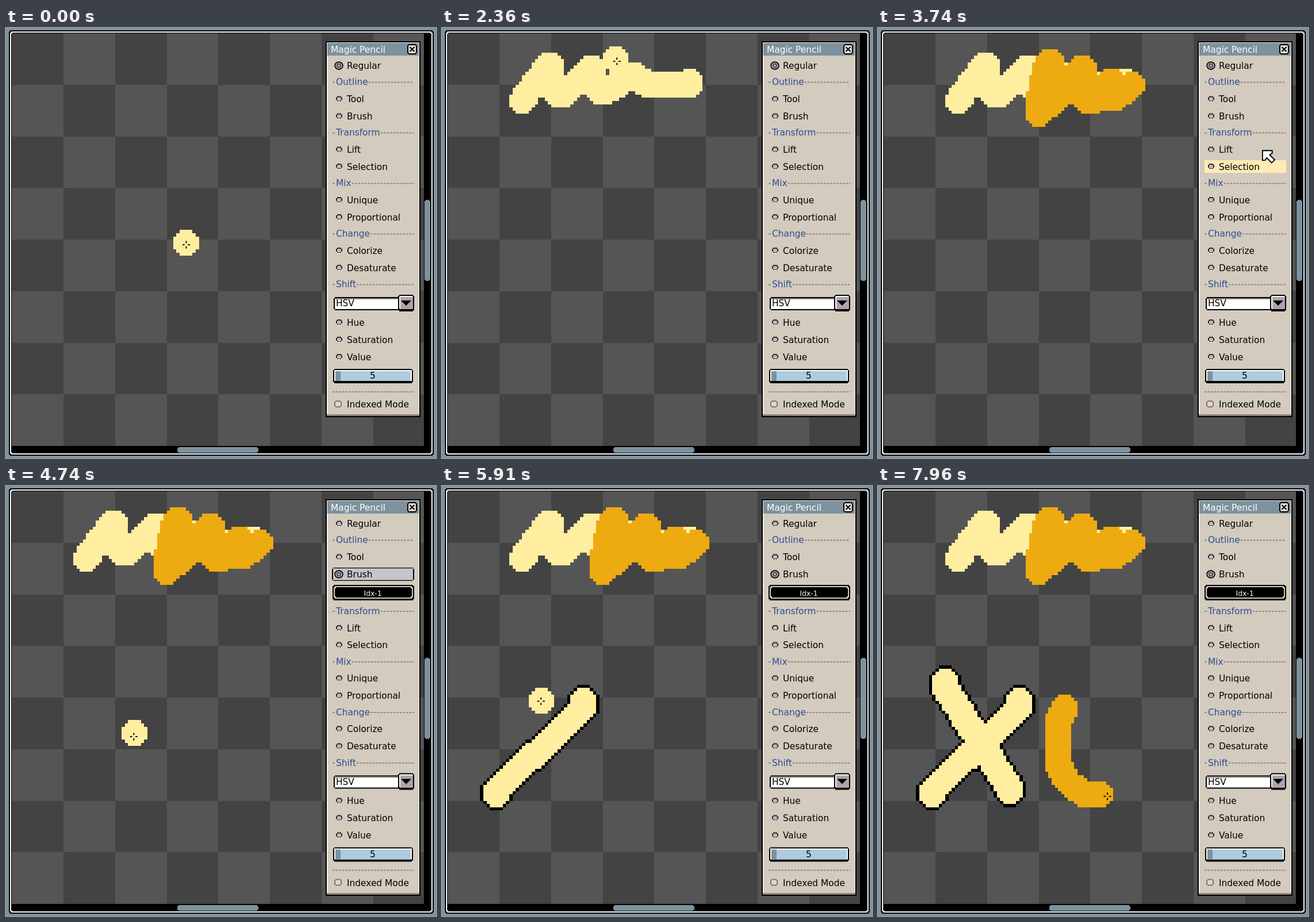
An HTML page with a canvas that plays this animation: 748 by 748 pixels, repeating every 8000 ms.

```html
<!DOCTYPE html>
<html lang="en">
<head>
<meta charset="utf-8">
<title>Magic Pencil</title>
<style>
html, body { margin: 0; width: 100%; height: 100%; overflow: hidden; background: #7d929e; }
canvas { display: block; width: 748px; height: 748px; }
</style>
</head>
<body>
<canvas id="stage" width="748" height="748"></canvas>
<script>
const ctx = document.getElementById('stage').getContext('2d');
const LOOP = 8000, SIZE = 128, CELL = 5.61, LEFT = 10.3, TOP = 9.1, UI = 1.87;
const BRUSH_LAG = 15, HOVER_LAG = 55;
const SLATE = '#7d929e', BEIGE = '#d3cbbe', BLACK = '#000', WHITE = '#fff', CREAM = '#ffebb6';
const YELLOW = 1, ORANGE = 2, EDGE = 3;
const INKS = [null, '#ffeea0', '#edab11', BLACK];

// Screen updates come in runs: start, end, number of intervals.
const runs = [
  [0, 0, 1], [590, 1360, 13], [1420, 2200, 13], [2260, 2360, 2], [2360, 3060, 12],
  [3090, 3740, 12], [3740, 3860, 2], [3920, 4130, 2], [4470, 4740, 5], [4740, 5230, 9],
  [5450, 5910, 9], [5910, 6160, 5], [6350, 7070, 12], [7070, 7130, 1], [7190, 7960, 17]
];

// Pointer path in sprite pixels; segments with ink paint as they go.
const track = [
  { t: [0, 1], pts: [[53.55, 65.1]] },
  { t: [560, 1120], pts: [[23, 21]] },
  { t: [1175, 2185], ink: YELLOW, pts: [[23, 21], [31, 10], [32, 10], [31, 16], [33, 18], [35, 19],
    [36, 19], [44, 11], [45, 11], [44, 15], [46, 17], [48, 18], [49, 18], [57, 13], [58, 13],
    [62, 16], [73, 16], [75, 16], [75, 15]] },
  { t: [2230, 2345], pts: [[51.9, 8.2]] },
  { t: [2375, 2480], pts: [[48, 25]] },
  { t: [2500, 3125], ink: ORANGE, pts: [[48, 25], [48, 22], [49, 17], [50, 12], [51, 9], [52, 9],
    [52, 22], [58, 15], [61, 11], [62, 11], [60, 17], [62, 20], [64, 21], [65, 21], [70, 15],
    [71, 15], [70, 20], [72, 20], [77, 16]] },
  { t: [3150, 3480], pts: [[107, 46]] },
  { t: [3480, 3560], pts: [[114, 48.7]] },
  { t: [3560, 3740], pts: [[116.7, 35.7]] },
  { t: [3740, 3860], pts: [[114, 25.2]] },
  { t: [4440, 4725], pts: [[38, 75]] },
  { t: [4725, 5210], pts: [[15, 94]] },
  { t: [5430, 5750], ink: YELLOW, outline: true, pts: [[15, 94], [15, 93], [26, 82], [27, 82],
    [42, 67], [42, 65]] },
  { t: [5770, 5895], pts: [[29, 65]] },
  { t: [5895, 6130], pts: [[19, 59]] },
  { t: [6330, 6720], ink: YELLOW, outline: true, pts: [[19, 59], [19, 61], [39, 92], [39, 93]] },
  { t: [6750, 7050], pts: [[57, 68.55]] },
  { t: [7085, 7115], pts: [[56, 67]] },
  { t: [7160, 7940], ink: ORANGE, pts: [[56, 67], [56, 68], [54, 71], [54, 85], [57, 90],
    [62, 94], [67, 94]] },
  { t: [7942, 7960], pts: [[68.8, 94.1]] }
];

function rasterize(pts) {
  const cells = [pts[0]];
  for (let i = 1; i < pts.length; i++) {
    const [ax, ay] = pts[i - 1], [bx, by] = pts[i];
    const n = Math.max(Math.abs(bx - ax), Math.abs(by - ay));
    for (let k = 1; k <= n; k++) {
      cells.push([Math.round(ax + (bx - ax) * k / n), Math.round(ay + (by - ay) * k / n)]);
    }
  }
  return cells;
}

let last = track[0].pts[0];
for (const seg of track) {
  seg.path = seg.ink ? rasterize(seg.pts) : [last, seg.pts[0]];
  last = seg.pts[seg.pts.length - 1];
}

const progress = (seg, t) => Math.min(1, Math.max(0, (t - seg.t[0]) / (seg.t[1] - seg.t[0])));
const latest = (list, t, start) => list.filter(item => start(item) <= t).pop() || list[0];

function pointerAt(t) {
  const seg = latest(track, t, s => s.t[0]);
  const f = progress(seg, t) * (seg.path.length - 1);
  const i = Math.min(Math.floor(f), seg.path.length - 2);
  const [a, b] = [seg.path[i], seg.path[i + 1]];
  return [a[0] + (b[0] - a[0]) * (f - i), a[1] + (b[1] - a[1]) * (f - i)];
}

function stepTime(t) {
  const [start, end, n] = latest(runs, t, r => r[0]);
  const gap = (end - start) / n;
  return gap ? start + gap * Math.min(n, Math.floor((t - start) / gap + 1e-6)) : start;
}

const toScreen = ([x, y]) => [LEFT + CELL * (x + 0.5), TOP + CELL * (y + 0.5)];

// Round brush, 8 pixels wide.
function stamp(grid, [cx, cy], value) {
  for (let r = 0; r < 8; r++) {
    const inset = Math.max(0, 2 - Math.min(r, 7 - r));
    for (let c = inset; c < 8 - inset; c++) {
      const x = Math.round(cx) - 4 + c, y = Math.round(cy) - 4 + r;
      if (x >= 0 && y >= 0 && x < SIZE && y < SIZE) grid[y * SIZE + x] = value;
    }
  }
}

function paintArt(t) {
  const art = new Uint8Array(SIZE * SIZE);
  for (const seg of track) {
    if (!seg.ink || t < seg.t[0]) continue;
    const f = progress(seg, t);
    const done = seg.path.slice(0, Math.floor(f * (seg.path.length - 1)) + 1);
    done.forEach(p => stamp(art, p, seg.ink));
    if (seg.outline && f === 1) {
      const mask = new Uint8Array(SIZE * SIZE);
      done.forEach(p => stamp(mask, p, 1));
      mask.forEach((on, i) => {
        if (on) for (const n of [i - 1, i + 1, i - SIZE, i + SIZE]) if (!art[n]) art[n] = EDGE;
      });
    }
  }
  return art;
}

const sheet = document.createElement('canvas');
sheet.width = sheet.height = SIZE;
const pen = sheet.getContext('2d');

function drawSprite(art) {
  for (let j = 0; j < 8; j++) {
    for (let i = 0; i < 8; i++) {
      pen.fillStyle = (i + j) % 2 ? '#555555' : '#434343';
      pen.fillRect(i * 16, j * 16, 16, 16);
    }
  }
  art.forEach((ink, i) => {
    if (!ink) return;
    pen.fillStyle = INKS[ink];
    pen.fillRect(i % SIZE, Math.floor(i / SIZE), 1, 1);
  });
  ctx.imageSmoothingEnabled = false;
  ctx.drawImage(sheet, LEFT, TOP, SIZE * CELL, SIZE * CELL);
}

function rect(x, y, w, h, color) {
  ctx.fillStyle = color;
  ctx.fillRect(x, y, w, h);
}

// Rectangle with its corner pixels cut away.
function box(x, y, w, h, color, cut = 2) {
  rect(x + cut, y, w - 2 * cut, h, color);
  rect(x, y + cut, w, h - 2 * cut, color);
}

function text(str, x, y, color = BLACK, size = 15.4, align = 'left') {
  ctx.font = `${size}px "DejaVu Sans", sans-serif`;
  ctx.textAlign = align;
  ctx.fillStyle = color;
  ctx.fillText(str, x, y);
  return ctx.measureText(str).width;
}

function shape(points, fill, stroke, width) {
  ctx.beginPath();
  points.forEach(([x, y]) => ctx.lineTo(x, y));
  ctx.closePath();
  if (stroke) {
    ctx.strokeStyle = stroke;
    ctx.lineWidth = width;
    ctx.stroke();
  }
  ctx.fillStyle = fill;
  ctx.fill();
}

function drawFrame() {
  rect(0, 0, 748, 748, SLATE);
  box(5, 4, 739, 740, BLACK);
  box(7, 6, 735, 736, WHITE);
  box(9, 8, 731, 732, BLACK);
}

function drawScrollbars() {
  rect(727, 9, 12, 730, BLACK);
  rect(10, 727, 729, 12, BLACK);
  box(728, 299, 10, 141, SLATE);
  box(298, 729, 141, 10, SLATE);
}

function dashes(from, y) {
  ctx.fillStyle = '#97807c';
  for (let x = from; x < 709; x += 3 * UI) ctx.fillRect(x, y, Math.min(2 * UI, 710 - x), UI);
}

function separator(label, y) {
  rect(568, y, 4, UI, '#97807c');
  const w = text(label, 574, y + 5.5, '#2c4c91');
  dashes(575 + w, y);
}

function ring(x, y, rx, ry, fill, stroke) {
  ctx.beginPath();
  ctx.ellipse(x, y, rx, ry, 0, 0, 7);
  ctx.fillStyle = fill;
  ctx.fill();
  ctx.strokeStyle = stroke;
  ctx.lineWidth = UI;
  ctx.stroke();
}

function radio(label, y, selected, hovered, focused) {
  if (focused) box(567, y - 11.5, 143, 23, BLACK);
  if (hovered || focused) box(569, y - 10, 139, 20, hovered ? CREAM : '#c6c3cb', 0);
  if (hovered && !focused) rect(568, y - 11, 142, 22, CREAM);
  if (selected) {
    ring(579, y, 6.8, 6.4, BEIGE, BLACK);
    ring(579, y, 3.4, 3.2, '#aaa0a8', '#4a4246');
  } else {
    box(575, y - 3, 9, 8, WHITE);
    box(574, y - 5, 11, 9, '#30282c');
    box(576, y - 3, 7, 6, '#c6b8c2', 1);
  }
  text(label, 593, y + 5.5);
}

function combo(y) {
  box(570, y - 11, 114, 23, BLACK);
  rect(572, y - 9, 111, 19, WHITE);
  rect(572, y - 9, 111, UI, '#97807c');
  text('HSV', 574, y + 5);
  box(682, y - 15, 28, 29, BLACK);
  box(684, y - 13, 24, 23, WHITE, 1);
  rect(686, y - 11, 22, 21, '#aea3ab');
  shape([[687, y - 5], [705, y - 5], [696, y + 4]], BLACK);
}

function slider(y) {
  box(569, y - 12, 139, 25, BLACK);
  rect(571, y - 10, 135, 19, WHITE);
  rect(573, y - 8, 131, 17, '#aecbdf');
  rect(573, y - 8, 9, 17, SLATE);
  text('5', 638, y + 5, BLACK, 15.4, 'center');
}

function drawClose() {
  box(698, 28, 17, 18, BLACK);
  box(700, 30, 13, 14, '#e6e1da', 1);
  ctx.strokeStyle = BLACK;
  ctx.lineWidth = 2;
  ctx.beginPath();
  ctx.moveTo(702.5, 33);
  ctx.lineTo(710.5, 41);
  ctx.moveTo(710.5, 33);
  ctx.lineTo(702.5, 41);
  ctx.stroke();
}

const groups = [
  ['Outline', 93.5, ['Tool', 123.5], ['Brush', 153.5]],
  ['Transform', 181.5, ['Lift', 211.5], ['Selection', 241]],
  ['Mix', 269.5, ['Unique', 299], ['Proportional', 329]],
  ['Change', 357.5, ['Colorize', 387], ['Desaturate', 417]],
  ['Shift', 445.5, ['Hue', 512], ['Saturation', 542], ['Value', 572]]
];

function drawPanel(t, hoverY) {
  const picked = t >= 3920, open = t >= 4020, focused = picked && t < 5450;
  const shift = open ? 35.5 : 0, h = open ? 690 : 654;
  rect(556, 23, 165, h, BLACK);
  rect(558, 25, 161, h - 4, '#f3efe8');
  rect(558, 20 + h - 2, 161, 3, '#97807c');
  rect(560, 48, 158, h - 30, BEIGE);
  rect(559, 26, 159, 22, SLATE);
  text('Magic Pencil', 565, 43, WHITE);
  drawClose();

  const option = (label, y) => {
    const selected = label === (picked ? 'Brush' : 'Regular');
    radio(label, y, selected, Math.abs(hoverY - y) < 11, selected && focused);
  };
  option('Regular', 65.5);
  groups.forEach(([title, y, ...options], i) => {
    const dy = i ? shift : 0;
    separator(title, y + dy);
    options.forEach(([label, oy]) => option(label, oy + dy));
  });
  if (open) {
    box(568, 172, 142, 27, BLACK);
    box(570, 174, 138, 22, BEIGE);
    box(572, 176, 134, 18, BLACK);
    text('Idx-1', 638, 190.5, WHITE, 12.3, 'center');
  }
  combo(479 + shift);
  slider(605 + shift);
  dashes(568, 632 + shift);
  box(571, 648 + shift, 13, 12, '#857670');
  box(573, 650 + shift, 9, 8, '#ddd6cb', 1);
  text('Indexed Mode', 593, 660 + shift);
}

function drawArrow(x, y) {
  const tip = [[2, 2], [17, 2], [17, 5], [12, 8.5], [21, 17], [17, 21], [8.5, 12], [5, 17], [2, 17]];
  shape(tip.map(([a, b]) => [x + a, y + b]), WHITE, BLACK, 2 * UI);
}

function drawCross(x, y) {
  const near = 1.5 * UI, arm = 2 * UI, half = UI / 2;
  for (const d of [-near - arm, near]) {
    rect(x + d, y - half, arm, UI, BLACK);
    rect(x - half, y + d, UI, arm, BLACK);
  }
}

function draw(now) {
  const t = stepTime(now);
  const [x, y] = toScreen(pointerAt(t));
  const overPanel = x >= 557;
  const art = paintArt(t - BRUSH_LAG);
  const busy = track.some(s => s.ink && t - BRUSH_LAG >= s.t[0] && t - BRUSH_LAG <= s.t[1]);
  if (!overPanel && !busy && t < 7160) stamp(art, pointerAt(t - BRUSH_LAG), YELLOW);

  drawFrame();
  drawSprite(art);
  drawScrollbars();
  if (!overPanel) drawCross(x, y);
  const [hx, hy] = toScreen(pointerAt(Math.max(0, t - HOVER_LAG)));
  const settled = t >= 3860;
  drawPanel(t, overPanel && hx >= 557 ? (settled ? y : hy) : -99);
  if (overPanel) drawArrow(x, y);
}

let origin = null;
function tick(now) {
  if (origin === null) origin = now;
  draw((now - origin) % LOOP);
  requestAnimationFrame(tick);
}
draw(0);
requestAnimationFrame(tick);
</script>
</body>
</html>
```
